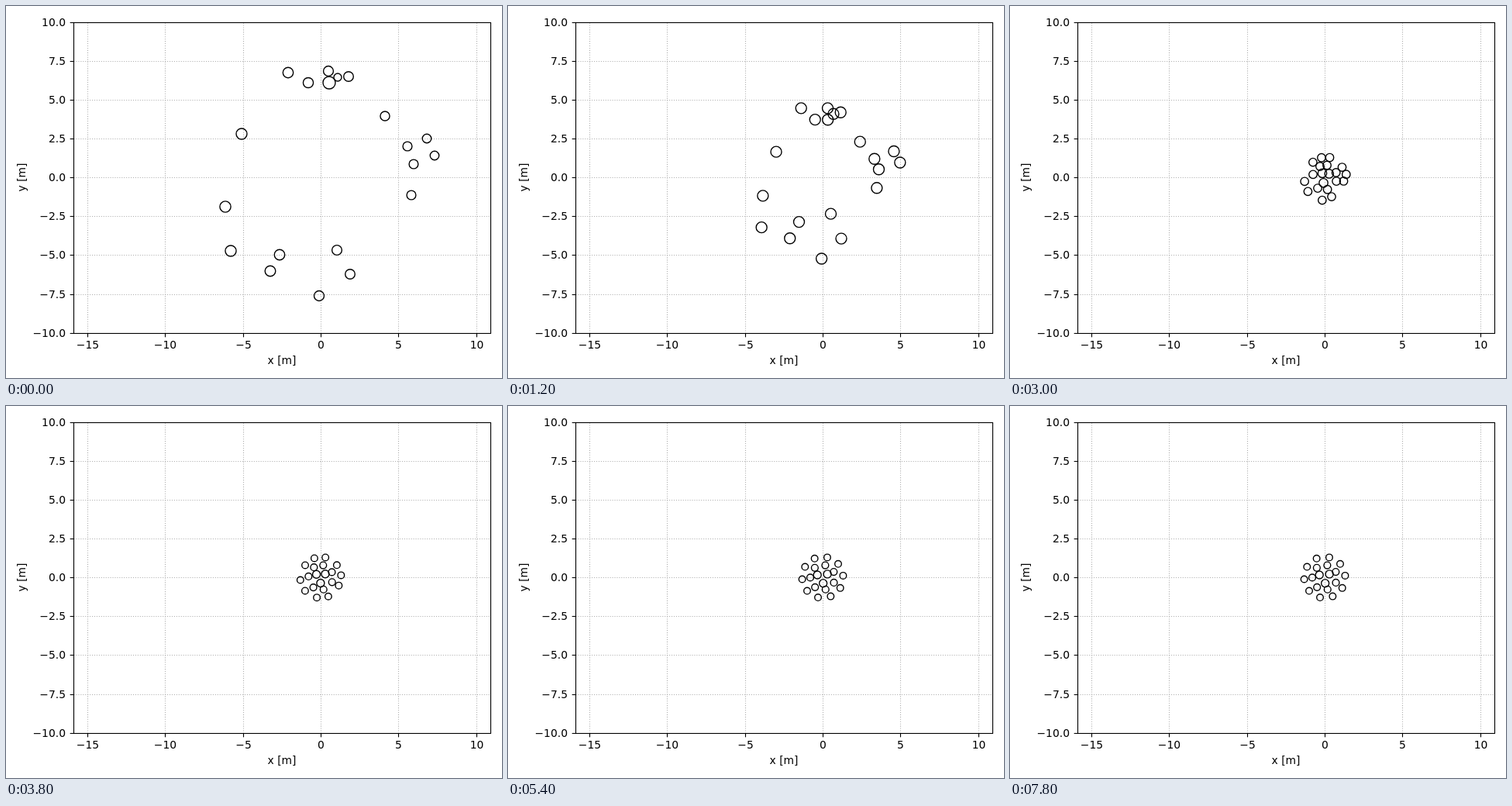
Animation, 640 px wide and 480 px high, one loop 8 s. Source, as an HTML page:

```html
<!DOCTYPE html>
<html lang="en">
<head>
<meta charset="utf-8">
<title>Gathering circles</title>
<style>
  html, body { margin: 0; width: 100%; height: 100%; overflow: hidden; background: #fff; }
  svg { display: block; width: 640px; height: 480px; }
  text { font: 13.89px "DejaVu Sans", sans-serif; text-anchor: middle; }
  .right { text-anchor: end; }
  .axis { fill: none; stroke: #000; stroke-width: 1.11; }
  .grid { stroke: #b0b0b0; stroke-width: 1.11; stroke-dasharray: 1.11 1.83; }
  circle { fill: none; stroke: #000; stroke-width: 1.39; }
</style>
</head>
<body>
<svg id="plot" viewBox="0 0 640 480"></svg>
<script>
const LOOP = 8000, STEP = 200;
const SPEED = 0.04; // walking speed, px per ms
const ORIGIN = { x: 406, y: 221.2 }, SCALE = 20.055;
const BOX = { left: 87.5, top: 21.5, right: 625.5, bottom: 422.5 };
const plot = document.getElementById('plot');

function add(tag, attrs, content = '') {
  const node = document.createElementNS('http://www.w3.org/2000/svg', tag);
  for (const key in attrs) node.setAttribute(key, attrs[key]);
  node.textContent = content;
  plot.append(node);
  return node;
}

const line = (cls, x1, y1, x2, y2) => add('line', { class: cls, x1, y1, x2, y2 });
const snap = v => Math.round(v) + 0.5;
const signed = label => label.replace('-', '\u2212');

function drawAxes() {
  for (let v = -15; v <= 10; v += 5) {
    const x = snap(ORIGIN.x + v * SCALE);
    line('grid', x, BOX.bottom, x, BOX.top);
    line('axis', x, BOX.bottom, x, BOX.bottom + 4.86);
    add('text', { x, y: 442 }, signed(String(v)));
  }
  for (let v = -10; v <= 10; v += 2.5) {
    const y = snap(ORIGIN.y - v * SCALE);
    line('grid', BOX.left, y, BOX.right, y);
    line('axis', BOX.left, y, BOX.left - 4.86, y);
    add('text', { class: 'right', x: 77, y: y + 4.5 }, signed(v.toFixed(1)));
  }
  add('rect', { class: 'axis', x: BOX.left, y: BOX.top,
    width: BOX.right - BOX.left, height: BOX.bottom - BOX.top });
  add('text', { x: 356, y: 462 }, 'x [m]');
  add('text', { transform: 'translate(25 221) rotate(-90)' }, 'y [m]');
}

// The crowd ends up in three rings; each lists where its members start, in ring order.
const RINGS = [
  { reach: 26.5, phase: -5, size: 4.3, starts: [
    [553, 193], [526, 204], [444, 346], [404, 374], [290, 316],
    [283, 259], [364, 86], [416, 84], [442, 91], [543, 171]] },
  { reach: 16, phase: 25, size: 4.4, starts: [
    [523, 244], [427, 315], [341, 342], [304, 165], [390, 99], [428, 92, 5], [518, 181]] },
  { reach: 7.5, phase: 85, size: 5, starts: [
    [353, 321], [417, 99, 8], [489, 142]] },
];

const mix = (a, b, u) => a + (b - a) * u;
const progress = (t, from, to) => Math.max(0, Math.min(1, (t - from) / (to - from)));
const easeOut = u => 1 - (1 - u) ** 2;

function makeWalker({ reach, phase, size, starts }, index) {
  const [x, y, startSize = 7.1 - (starts[index][0] - 283) * 0.005] = starts[index];
  const dx = ORIGIN.x - x, dy = ORIGIN.y - y;
  const dist = Math.hypot(dx, dy);
  const angle = (phase + index * 360 / starts.length) * Math.PI / 180;
  const place = { x: ORIGIN.x + reach * Math.cos(angle), y: ORIGIN.y + reach * Math.sin(angle) };
  const node = add('circle', {});

  // Walk straight in as far as the ring, then slide along to a free place.
  return t => {
    const walked = Math.min(SPEED * t, dist - reach) / dist;
    const settle = easeOut(progress(t, 2200, 5000));
    const free = mix(startSize, 7, progress(t, 0, 1000));
    node.setAttribute('cx', mix(x + dx * walked, place.x, settle));
    node.setAttribute('cy', mix(y + dy * walked, place.y, settle));
    node.setAttribute('r', mix(free, size, progress(t, 2200, 3400)));
  };
}

drawAxes();
const walkers = RINGS.flatMap(ring => ring.starts.map((_, i) => makeWalker(ring, i)));

function draw() {
  const t = Math.floor(performance.now() % LOOP / STEP) * STEP;
  walkers.forEach(move => move(t));
  requestAnimationFrame(draw);
}
draw();
</script>
</body>
</html>
```
